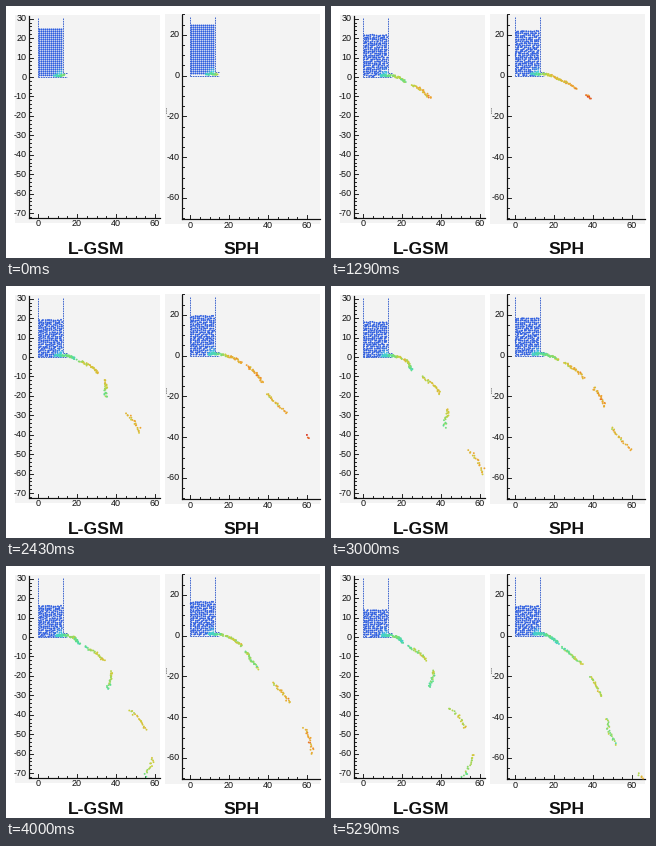
Animation, 319 px wide and 252 px high, one loop 5430 ms. Source, as a matplotlib script:

```python
import numpy as np
import matplotlib.pyplot as plt
from matplotlib.animation import FuncAnimation
from matplotlib.colors import LinearSegmentedColormap

W, H, DPI = 319, 252, 100
LOOP, TICK, STEPS = 5430, 30, 38    # loop and tick in ms, poses per loop
PT = 72 / DPI
GRAVITY = 0.28                      # half acceleration, px per step squared
RATE = 9                            # particles released per step
INK = "#101010"

cmap = LinearSegmentedColormap.from_list(
    "speed", ["#2f5fe0", "#3cc8e6", "#5ae08c", "#c8d23c", "#f0a030", "#d82818"])

plt.rcParams["font.family"] = "Liberation Sans"
fig = plt.figure(figsize=(W / DPI, H / DPI), dpi=DPI, facecolor="white")
ax = fig.add_axes([0, 0, 1, 1])
ax.set_xlim(0, W)
ax.set_ylim(H, 0)
ax.axis("off")


def line(xs, ys, lw=1.2, color=INK, **kw):
    ax.plot(xs, ys, color=color, lw=lw * PT, **kw)


def label(x, y, text, px, **kw):
    ax.text(x, y, text, size=px * PT, color=INK, **kw)


def pulse(r, dip_at, period):
    """1 at every dip, 0 halfway between."""
    return (0.5 + 0.5 * np.cos(2 * np.pi * (r - dip_at) / period))**2


class Panel:
    """Draining tank with axes; box is left, top, right, bottom in px."""

    def __init__(self, box, axis, origin, y_scale, y_step, y_minor,
                 title, title_x):
        self.box, self.axis = box, axis
        self.x0, self.y0 = origin
        self.sx, self.sy = 1.95, y_scale
        self.draw_axes(y_step, y_minor)
        self.draw_tank()
        label(title_x, 248, title, 17.5, weight="bold", ha="center")

    def draw_axes(self, y_step, y_minor):
        l, t, r, b = self.box
        ax.add_patch(plt.Rectangle((l, t), r - l, b + 5 - t, fc="#f3f3f3", lw=0))
        line([self.axis] * 2, [t + 1, b])
        line([self.axis, r], [b, b])
        for v in range(-80, 32, y_minor):
            y = self.y0 - v * self.sy
            if not t < y < b:
                continue
            major = v % y_step == 0
            line([self.axis, self.axis + (4.5 if major else 2)], [y, y], 0.9)
            if major:
                label(self.axis - 2, y, str(v), 9, ha="right", va="center")
        for v in range(0, 65, 5):
            x = self.x0 + v * self.sx
            major = v % 20 == 0
            line([x, x], [b, b - (4.5 if major else 2)], 0.9)
            if major:
                label(x, b + 6, str(v), 9, ha="center", va="center")

    def draw_tank(self):
        x, y, top = self.x0, self.y0, self.box[1] + 3
        for xs, ys in (([-0.5, -0.5], [top, y]), ([25, 25], [top, y - 4]),
                       ([-0.5, 29], [y, y]), ([25, 29], [y - 4, y - 4])):
            line([x + xs[0], x + xs[1]], ys, 1, "#456bd0",
                 ls=(0, (1.6, 0.8)), zorder=2)

    def fill(self, seed, exit_y, speed, slowing, dip, dip_at, period,
             gap_at, gap_every):
        rng = np.random.default_rng(seed)
        cols, rows = np.meshgrid(np.arange(12), np.arange(26))
        self.cells = 2.0 * np.stack([cols.ravel(), rows.ravel()], 1)
        self.noise = rng.uniform(-0.5, 0.5, self.cells.shape)
        self.phase = rng.uniform(0, 2 * np.pi, (len(self.cells), 1))

        # each release has a pulsing exit speed; gaps recur between clumps
        r = np.arange(-0.3, STEPS + 2, 1 / RATE)
        v = speed - slowing * r - dip * pulse(r, dip_at, period)
        self.born = r
        self.speed = v + rng.normal(0, 0.04, len(r))
        self.gap = np.abs((r - gap_at + gap_every / 2) % gap_every
                          - gap_every / 2)
        self.hue = 0.62 + 0.25 * (v - 4.2) + rng.normal(0, 0.06, len(r))
        self.spread = rng.uniform(-1, 1, (len(r), 2))
        self.exit = np.array([self.x0 + 25.5, exit_y])

        dots = dict(marker="o", linewidths=0)
        self.fluid = ax.scatter([], [], s=(1.9 * PT)**2, zorder=3, **dots)
        self.jet = ax.scatter([], [], s=(1.9 * PT)**2, zorder=4, **dots)

    def place_fluid(self, n):
        top = self.y0 - 25 * self.sy + 0.7 * n - 0.0035 * n**2
        stir = self.noise + 0.3 * np.sin(self.phase + 0.6 * n)
        pos = self.cells + [self.x0 + 1.5, top + 1] + min(n / 4, 1) * stir
        pos = pos[pos[:, 1] < self.y0]
        d2 = ((pos - [self.x0 + 23, self.y0 - 2])**2).sum(1)
        self.fluid.set_offsets(pos)
        self.fluid.set_facecolors(cmap(0.25 * np.exp(-d2 / 20)))

    def place_jet(self, n):
        age = n - self.born
        fall = np.maximum(age, 0)
        pos = self.exit + self.spread + np.stack(
            [self.speed * age, GRAVITY * fall**2], 1)
        shade = self.hue + (0.25 - self.hue) * np.clip((3 - age) / 5, 0, 1)
        ok = ((age > -2) & (self.gap > np.minimum(0.08 * fall, 1.2))
              & (pos[:, 0] < self.box[2]) & (pos[:, 1] < self.box[3]))
        self.jet.set_offsets(pos[ok])
        self.jet.set_facecolors(cmap(np.clip(shade, 0.1, 1)[ok]))

    def update(self, n):
        self.place_fluid(n)
        self.place_jet(n)


left = Panel((9, 9, 154, 212), 22.5, (32, 71), 1.945, 10, 2, "L-GSM", 90.5)
left.fill(3, exit_y=69.5, speed=4.7, slowing=0.025, dip=1.1, dip_at=4.7,
          period=9.1, gap_at=3.8, gap_every=4.6)

right = Panel((159, 8, 314, 213), 175.5, (184, 69.5), 2.04, 20, 5, "SPH", 235)
right.fill(8, exit_y=68, speed=5.4, slowing=0.055, dip=0.7, dip_at=4.7,
           period=13.3, gap_at=1.2, gap_every=4.9)
line([160, 160], [102, 108], 0.8, ls=":")


def update(i):
    n = int((i * TICK + 20) * STEPS / LOOP)
    left.update(n)
    right.update(n)
    return ()


anim = FuncAnimation(fig, update, frames=LOOP // TICK, interval=TICK,
                     init_func=lambda: update(0), repeat=True, repeat_delay=0)
plt.show()
```
